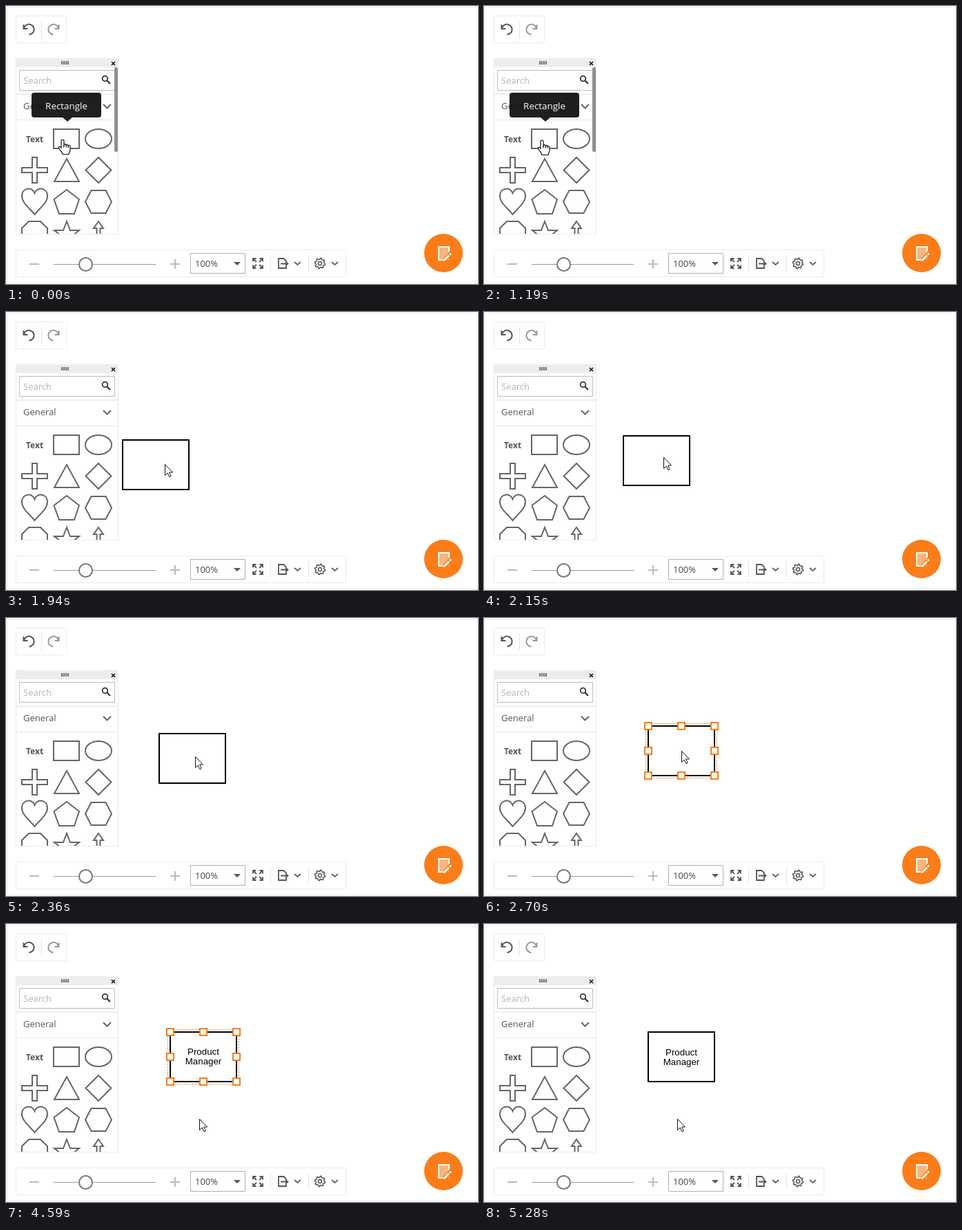
Write an HTML page with a canvas that moves like this. It is 684 px wide and 404 px high and loops after 6.24 s.

```html
<!DOCTYPE html>
<html lang="en">
<head>
<meta charset="utf-8">
<title>Diagram editor</title>
<style>
html, body { margin: 0; width: 100%; height: 100%; overflow: hidden; background: #fff; }
canvas { display: block; }
</style>
</head>
<body>
<canvas id="stage" width="684" height="404"></canvas>
<script>
const ctx = document.getElementById('stage').getContext('2d');
const LOOP = 6240, STEP = 30, DRAG_START = 1190, DRAG_END = 2540;
const ORANGE = '#fa7d19', SHAPE = '#666', ICON = '#555', FRAME = '#ebebeb';
const UI = '"Open Sans", "Noto Sans", sans-serif';

// Keys: time, x, y
const CURSOR = [[1160, 82, 194], [1190, 84, 195], [1460, 116, 207], [1700, 174, 220],
  [1790, 199, 224], [1860, 216, 224], [2150, 260, 211], [2420, 278, 198], [2540, 286, 193]];
const BOX = [[1460, 52, 168], [1700, 110, 180], [1790, 135, 184], [1860, 153, 186],
  [2150, 201, 179], [2420, 226, 163], [2540, 237, 156]];
const LEAVE = [[3450, 286, 193], [3520, 278, 215], [3600, 273, 255], [3670, 279, 283]];

// Smooth curve through the keys
function along(keys, t) {
  const last = keys.length - 1;
  if (t <= keys[0][0]) return keys[0].slice(1);
  if (t >= keys[last][0]) return keys[last].slice(1);
  const i = keys.findIndex(k => k[0] > t) - 1;
  const a = keys[i], b = keys[i + 1], p = keys[Math.max(0, i - 1)], n = keys[Math.min(last, i + 2)];
  const d = b[0] - a[0], u = (t - a[0]) / d, u2 = u * u, u3 = u2 * u;
  return [1, 2].map(c => {
    const ma = (b[c] - p[c]) / (b[0] - p[0]) * d;
    const mb = (n[c] - a[c]) / (n[0] - a[0]) * d;
    return Math.round((2 * u3 - 3 * u2 + 1) * a[c] + (u3 - 2 * u2 + u) * ma +
      (3 * u2 - 2 * u3) * b[c] + (u3 - u2) * mb);
  });
}

const stepped = (t, from) => from + Math.floor((t - from) / STEP) * STEP;

function stroke(d, color = ICON, width = 2) {
  ctx.strokeStyle = color;
  ctx.lineWidth = width;
  ctx.stroke(new Path2D(d));
}

function fill(d, color) {
  ctx.fillStyle = color;
  ctx.fill(new Path2D(d));
}

function rect(x, y, w, h, color) {
  ctx.fillStyle = color;
  ctx.fillRect(x, y, w, h);
}

function frame(x, y, w, h, color, radius = 0) {
  ctx.strokeStyle = color;
  ctx.lineWidth = 1;
  ctx.beginPath();
  ctx.roundRect(x + .5, y + .5, w - 1, h - 1, radius);
  ctx.stroke();
}

function circle(x, y, r, bg, line, width = 2) {
  ctx.beginPath();
  ctx.arc(x, y, r, 0, 7);
  if (bg) { ctx.fillStyle = bg; ctx.fill(); }
  if (line) { ctx.strokeStyle = line; ctx.lineWidth = width; ctx.stroke(); }
}

function text(s, x, y, color, font, align = 'left') {
  ctx.font = font;
  ctx.fillStyle = color;
  ctx.textAlign = align;
  ctx.fillText(s, x, y);
}

function at(x, y, draw) {
  ctx.save();
  ctx.translate(x, y);
  draw();
  ctx.restore();
}

const chevron = (x, y, w, h) => stroke(`M${x} ${y}l${w} ${h}l${w} ${-h}`, '#666');

function history() {
  frame(14, 14, 74, 40, FRAME, 2);
  rect(51, 22, 1, 25, '#e4e4e4');
  const arrow = 'M-8 -7V-1H-2M-7.5 -1.5A7.4 7.4 0 1 1 0 7.4';
  at(33.5, 34, () => stroke(arrow, '#555'));
  at(68.5, 34, () => { ctx.scale(-1, 1); stroke(arrow, '#999'); });
}

function shapes() {
  ctx.save();
  ctx.beginPath();
  ctx.rect(15, 166, 147, 165);
  ctx.clip();
  text('Text', 29, 198, '#555', `bold 12px ${UI}`);
  [
    'M69 179H106V207H69Z',
    'M115 193A19 14 0 0 1 153 193A19 14 0 0 1 115 193Z',
    'M38 220h7v15h15v7h-15v15h-7v-15h-15v-7h15Z',
    'M88 222L106 255H70Z',
    'M134 220L152.500 238.500L134 257L115.500 238.500Z',
    'M41.5 303C36 295 23 287 23 276C23 264 38 262 41.5 272C45 262 60 264 60 276C60 287 47 295 41.5 303Z',
    'M88 267L106 281L99 302H77L69.500 281Z',
    'M115 284.500L123.500 268H144.500L153 284.500L144.500 301H123.500Z',
    'M23 340V323L33 313H50L60 323V340',
    'M80 334L70 326H83L88 313L93 326H106L96 334',
    'M131.500 340V323H127L134 313L141 323H136.500V340'
  ].forEach(d => stroke(d, SHAPE));
  ctx.restore();
}

function toolbox() {
  frame(14, 76, 149, 256, FRAME);
  rect(14, 76, 149, 13, '#ededed');
  for (let x = 80; x < 92; x += 2) rect(x, 80, 1, 5, '#444');
  stroke('M153 81l5 5m0 -5l-5 5', '#111', 1.6);
  frame(19, 93, 139, 30, '#bbb');
  text('Search', 25, 113, '#b5b5b5', `13px ${UI}`);
  circle(143.500, 105.500, 3.8, null, '#333', 1.8);
  stroke('M146.500 108.500L151 113', '#333', 2.2);
  rect(15, 127, 147, 2, '#eee');
  text('General', 25, 150, '#555', `13px ${UI}`);
  chevron(141, 143, 5.5, 5.5);
  rect(15, 165, 147, 1, '#e8e8e8');
  shapes();
}

function gear() {
  at(455, 374, () => {
    ctx.beginPath();
    for (let i = 0; i < 32; i++) {
      const a = (i + .5) * Math.PI / 16, r = i % 4 < 2 ? 7.6 : 5.8;
      ctx.lineTo(r * Math.cos(a), r * Math.sin(a));
    }
    ctx.closePath();
    ctx.strokeStyle = ICON;
    ctx.lineWidth = 1.5;
    ctx.stroke();
    circle(0, 0, 2.6, null, ICON, 1.5);
  });
}

function viewBar() {
  frame(14, 354, 479, 40, FRAME, 2);
  rect(34, 374, 14, 2, '#bbb');
  rect(69, 375, 148, 1, '#999');
  circle(115.500, 375.500, 9.500, '#fff', '#777');
  rect(238, 374, 14, 2, '#bbb');
  rect(244, 368, 2, 14, '#bbb');
  frame(267, 359, 80, 30, '#b0b0b0');
  text('100%', 274, 379, '#444', `13px ${UI}`);
  fill('M330 372h10l-5 5Z', '#555');
  for (const sx of [-1, 1]) for (const sy of [-1, 1]) at(365, 374, () => {
    ctx.scale(sx, sy);
    stroke('M2.500 7H7V2.500M2 2L6.500 6.500', ICON, 1.8);
  });
  rect(383, 362, 1, 24, '#e5e5e5');
  stroke('M406 371V370.500L402.500 367H395V381H406V378', ICON, 1.8);
  stroke('M398 374.500H408M405 371.500L408.500 374.500L405 377.500', ICON, 1.8);
  chevron(418, 372, 4.5, 4);
  rect(438, 362, 1, 24, '#e5e5e5');
  gear();
  chevron(472, 372, 4.5, 4);
}

function editButton() {
  circle(634, 359, 28, ORANGE);
  fill('M627 350H642V369H627Z', '#fcb47c');
  stroke('M642 357V350H627V369H633', '#fff');
  stroke('M635 369.500L644.500 360', ORANGE, 6);
  stroke('M636 368.500L642 362.500', '#fff', 3);
  stroke('M643 361.500L645 359.500', '#fff', 3);
  fill('M633.500 371L634.500 367L637.500 370Z', '#fff');
}

function tooltip(alpha) {
  ctx.globalAlpha = alpha;
  ctx.beginPath();
  ctx.roundRect(37, 126, 101, 36, 4);
  ctx.fillStyle = 'rgba(18,18,18,.94)';
  ctx.fill();
  fill('M82 162H96L89 168Z', '#222');
  text('Rectangle', 87.500, 150, '#fff', `13.4px ${UI}`, 'center');
  ctx.globalAlpha = 1;
}

function scrollbar(alpha) {
  ctx.globalAlpha = alpha;
  ctx.beginPath();
  ctx.roundRect(157, 89, 5, 123, 2);
  ctx.fillStyle = '#8f8f8f';
  ctx.fill();
  ctx.globalAlpha = 1;
}

function block(x, y) {
  rect(x, y, 98, 74, '#000');
  rect(x + 2, y + 2, 94, 70, '#fff');
}

function selection(color) {
  ctx.setLineDash([2, 2]);
  frame(234, 153, 104, 80, color);
  ctx.setLineDash([]);
  for (const x of [238, 286, 334]) for (const y of [157, 193, 229]) {
    if (x === 286 && y === 193) continue;
    rect(x - 6, y - 6, 12, 12, color);
    rect(x - 4, y - 4, 8, 8, '#fff');
  }
}

function connectors() {
  for (const [x, y] of [[286, 141], [350, 193], [286, 245], [222, 193]])
    circle(x, y, 5, '#fff', ORANGE);
}

function label(shift) {
  const font = '13.33px "Liberation Sans", Arial, sans-serif';
  text('Product', 286, 191 + shift, '#000', font, 'center');
  text('Manager', 286, 205 + shift, '#000', font, 'center');
}

const pointers = {
  arrow() {
    const d = 'M.5 .5V16.500L4.300 13L6.800 18.700L9.200 17.700L6.700 12H11.500Z';
    fill(d, '#fff');
    stroke(d, '#111', 1);
  },
  hand() {
    const d = 'M-2 2C-2 -.7 2 -.7 2 2V8C2.500 6 5 6 5.200 8.600C6 7 8 7.300 8.200 9.400' +
      'C9 8 11.500 8.600 11 10.500V15C11 17 9.500 18.500 9 21.500H0C-.5 18 -4 15 -5.500 12.500C-6.500 10 -4 9.500 -2 12Z';
    fill(d, '#fff');
    stroke(d, '#111', 1.2);
    stroke('M2 8V11M5.200 8.600V11.500M8.200 9.400V12', '#111', 1);
  },
  beam() {
    stroke('M-3 -7.500H0M1 -7.500H4M.5 -7V8M-3 8.500H0M1 8.500H4', '#111', 1);
  }
};

function pointer(t) {
  let kind = 'arrow', pos;
  if (t < DRAG_START) pos = CURSOR[0].slice(1);
  else if (t < 3450) pos = along(CURSOR, stepped(t, DRAG_START));
  else if (t < 3670) pos = along(LEAVE, stepped(t, 3450));
  else pos = [t < 4030 ? 279 : 280, 283];
  if (t < 1460) kind = 'hand';
  else if (t >= 3220 && t < 3480) kind = 'beam';
  at(pos[0], pos[1], pointers[kind]);
}

function render(t) {
  const fade = (from, span) => Math.max(0, Math.min(1, 1 - (t - from) / span));
  rect(0, 0, 684, 404, '#fff');
  frame(1, 1, 682, 402, FRAME);
  history();
  toolbox();
  viewBar();
  editButton();
  if (t < 1860) scrollbar(fade(1730, 120));
  if (t < 1940) tooltip(fade(1820, 120));
  if (t >= 1460) block(...along(BOX, stepped(Math.min(t, DRAG_END), DRAG_START)));
  if (t >= 2700 && t < 5280) selection(t < 4920 ? ORANGE : '#aaa');
  if (t >= 2800 && t < 3220) connectors();
  if (t >= 3450 && t < 3970) rect(286, 186, 1, 15, '#000');
  if (t >= 4530) label(t < 4920 ? -1 : 0);
  if (t >= 4530 && t < 4590) rect(312, 194, 1, 13, '#000');
  pointer(t);
}

const start = performance.now();
function tick() {
  render((performance.now() - start) % LOOP);
  requestAnimationFrame(tick);
}
tick();
</script>
</body>
</html>
```
